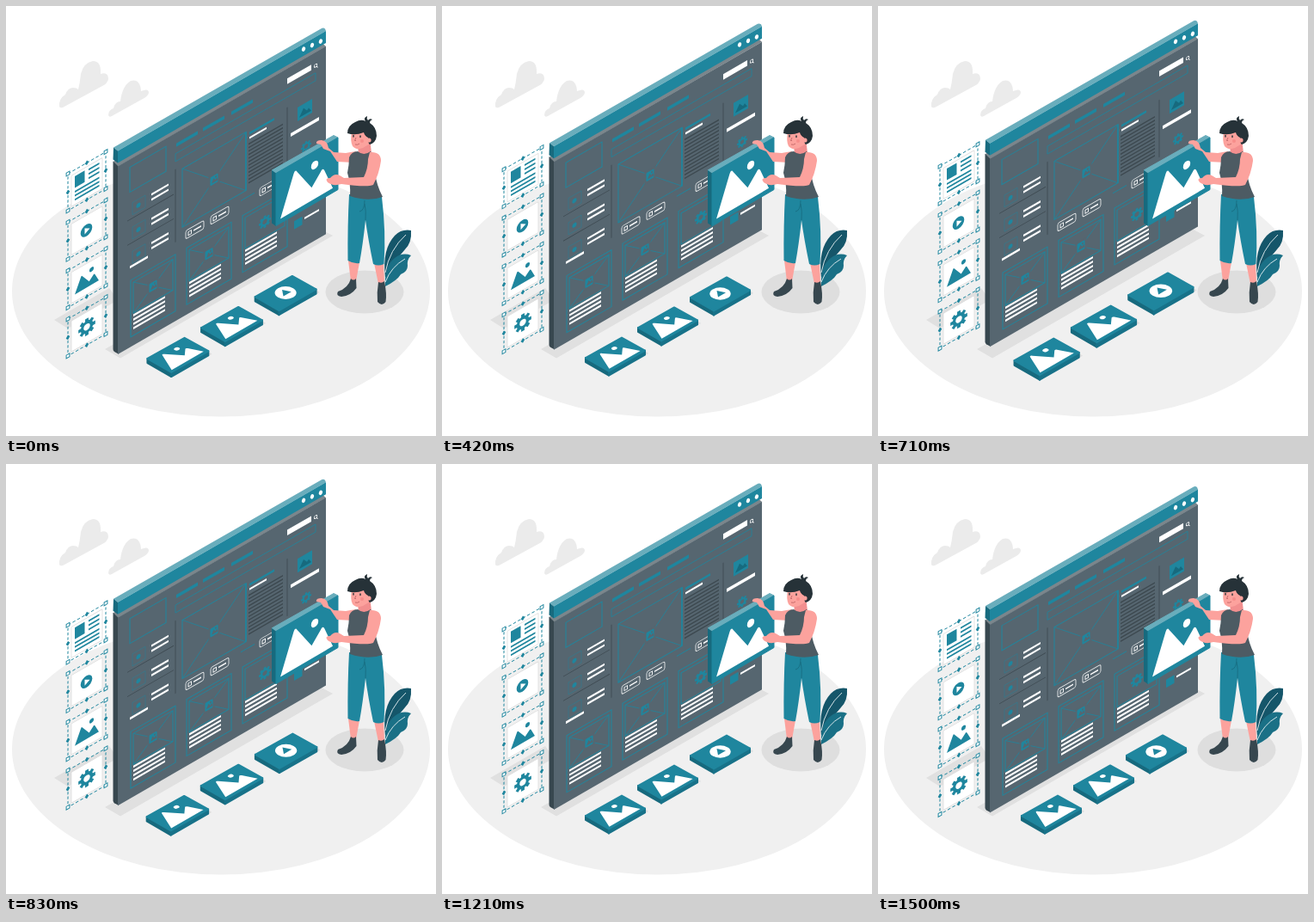
Recreate the animation shown at these times as an HTML page. Size 500 px wide and 500 px high, loop 1.54 s.

```html
<!DOCTYPE html>
<html lang="en">
<head>
<meta charset="utf-8">
<title>Wireframe builder</title>
<style>
html, body { margin: 0; width: 100%; height: 100%; overflow: hidden; background: #fff; }
svg { display: block; width: 100vw; height: 100vh; }
</style>
</head>
<body>
<svg viewBox="0 0 500 500">
  <ellipse cx="250" cy="331.500" rx="243" ry="146" fill="#f0f0f0"/>
  <g fill="#ebebeb">
    <path d="M62 117Q61 108 69 103Q72 95 78 95Q82 95 84 97Q86 89 87 79Q90 66 101 64Q111 64 110 79Q119 76 119 85Q118 90 112 93L66 118Q63 119 62 117Z"/>
    <path d="M119 127Q119 121 125 119Q127 111 133 111Q135 93 145 87Q156 84 157 99Q166 95 166 101Q165 105 159 108L123 128Q120 130 119 127Z"/>
  </g>
  <path d="M56 365L120 328L130 342L72 375ZM115 399L133 409.500L380 267L365 259Z" fill="#e0e0e0"/>
  <ellipse cx="417" cy="332.500" rx="45.500" ry="25" fill="#dedede"/>

  <g id="cards"></g>
  <g id="panel"></g>

  <g id="plant">
    <path d="M441 315Q437 283 452 267Q460 259 471 261Q472 275 464 283Q457 292 450 298Q445 304 443 315Z" fill="#15566a"/>
    <path d="M441 324Q440 302 452 293Q461 286 471 290Q466 295 467 302Q467 309 459 312Q455 319 441 326Z" fill="#1a7086"/>
    <path d="M441 310Q446 283 465 266M441 321Q448 303 464 294" fill="none" stroke="#e8f1f3" stroke-width=".9"/>
  </g>

  <g id="board"></g>

  <g id="person">
    <path d="M407 169Q400 170 395 171L381 170L375 165Q374 157 367 156Q360 156 361 160L366 161L369 166L377 169L385 181L404 182Z" fill="#fca29d"/>
    <path d="M398 296L411 298L407 320H401ZM428 299L439 299L440 323H433Z" fill="#fca29d"/>
    <path d="M401 317Q404 320 407 317L407.500 328Q401 337 390 338Q383 337 386 332Q398 328 401 317Z" fill="#37474f"/>
    <path d="M433 321Q437 323 440 320Q443 335 441.500 344Q437 350 432 344Q431 333 433 321Z" fill="#37474f"/>
    <path d="M399 219L437 222Q442 263 439.500 300Q433 303 427 300Q421 271 418 249Q415 277 411 299Q404 300 397.500 296Q397 255 399 219Z" fill="#1f869e"/>
    <path d="M417 226Q417 238 411 239M418 249Q419 238 417 230" fill="none" stroke="#176a7e" stroke-width=".8"/>
    <path d="M409 160L410 174Q417 178 425 171L423 154Z" fill="#f28f8f"/>
    <path d="M399 176Q402 169 409 169Q416 175 424 169Q430 178 428 190Q431 209 438 222Q421 228 400 221Q401 207 397 194Q399 184 399 176Z" fill="#4d5b63"/>
    <path d="M423 170Q436 169 436 180Q434 195 427 208Q420 211 390 207Q380 210 374 205Q370 200 377 200Q382 194 388 197L393 200L416 199Q421 189 421 178Z" fill="#fca29d"/>
    <path d="M402 146Q400 157 403 163Q407 168 415 165L425 159L424 142Z" fill="#fca29d"/>
    <path d="M397 148Q397 139 406 135Q413 131 418 134Q415 130 420 128Q419 131 421 133Q423 130 426 132Q423 133 423 136Q431 141 431 151Q430 159 423 161Q421 160 421 153Q417 151 416 147Q406 151 397 148Z" fill="#263238"/>
    <circle cx="422" cy="156" r="2.600" fill="#fca29d"/>
    <path d="M404 150.500V152M412 151V152.500" stroke="#263238" stroke-width="1.400" stroke-linecap="round"/>
    <path d="M407 153L405.500 156.500H407M406 161Q409 162 411 160" fill="none" stroke="#b95f60" stroke-width=".8"/>
    <circle cx="414" cy="157" r="2" fill="#f27f7e" opacity=".6"/>
  </g>
</svg>
<script>
const TEAL = '#1f869e', DEEP = '#176a7e', PALE = '#69adbc', INK = '#3d4950', SLATE = '#566670';
const LOOP = 1540, LEAD = 40, RISE = 9.5;
// Mountains in a unit square, shared by every picture symbol
const HILL = 'M.07 .91L.285 .2Q.31 .13 .34 .2L.575 .66L.72 .46Q.75 .4 .78 .47L.917 .9Z';
const el = id => document.getElementById(id);

const rect = (x, y, w, h, fill, extra = '') =>
  `<rect x="${x}" y="${y}" width="${w}" height="${h}" fill="${fill}" ${extra}/>`;
const path = (d, fill, extra = '') => `<path d="${d}" fill="${fill}" ${extra}/>`;
const box = (x, y, w, h, color = TEAL, sw = 1, extra = '') =>
  rect(x, y, w, h, 'none', `stroke="${color}" stroke-width="${sw}" ${extra}`);
const line = (d, color, sw = 0.8) => path(d, 'none', `stroke="${color}" stroke-width="${sw}"`);
const dot = (x, y, r, fill, extra = '') => `<circle cx="${x}" cy="${y}" r="${r}" fill="${fill}" ${extra}/>`;
const group = (m, inner) => `<g transform="matrix(${m})">${inner}</g>`;
const wall = (x, y, inner) => group(`1 -.577 0 1 ${x} ${y}`, inner);
const round = (c, w = 2) => `stroke="${c}" stroke-width="${w}" stroke-linejoin="round"`;
const times = (n, f) => Array.from({ length: n }, (_, i) => f(i)).join('');
const picture = m =>
  group(m, path(HILL, '#fff') + '<ellipse cx=".625" cy=".267" rx=".058" ry=".075" fill="#fff"/>');

function crossed(x, y, w, h) {
  return box(x, y, w, h) + line(`M${x} ${y}l${w} ${h}M${x} ${y + h}l${w} ${-h}`, TEAL, 0.7) +
    rect(x + w / 2 - 6.5, y + h / 2 - 7, 13, 14, SLATE) + glyph(x + w / 2, y + h / 2);
}

function glyph(x, y) {
  return rect(x - 4.5, y - 5, 9, 10, TEAL, 'rx="1"') +
    path(`M${x - 3} ${y + 3}l2.500 -5l2 3l1.500 -2l1.500 4Z`, SLATE) + dot(x + 2, y - 2.5, 1, SLATE);
}

function pill(x, y) {
  return box(x, y, 21, 9.5, '#e6e9ea', 0.9, 'rx="2"') + box(x + 3, y + 3, 3.5, 4, '#fff', 0.9) +
    rect(x + 9, y + 4, 9, 1.6, '#fff');
}

function listItem(i) {
  const y = 54 + i * 28.3;
  return box(17, y - 2, 15, 14, TEAL, 0.4) + dot(24, y + 5, 2.6, TEAL) +
    rect(39, y, 20, 2.4, '#fff') + rect(39, y + 6, 20, 2.4, '#fff') +
    (i < 2 ? line(`M11 ${y + 16}h54`, INK) : '');
}

function gear(x, y, r, color, hole) {
  return times(8, i => rect(x - r * 0.2, y - r, r * 0.4, r, color, `transform="rotate(${i * 45} ${x} ${y})"`)) +
    dot(x, y, r * 0.74, color) + dot(x, y, r * 0.38, hole);
}

function lowCard(i) {
  const x = 15 + i * 65;
  const pic = i < 2 ? crossed(x + 3, 145, 46, 36)
    : box(x + 3, 145, 46, 36) + gear(x + 26, 163, 7, TEAL, SLATE);
  return box(x, 141, 52, 66) + pic + times(4, n => rect(x + 3, 182.5 + n * 5, 37, 2.3, '#fff'));
}

function page() {
  return rect(0, 0, 242, 218.5, SLATE) +
    rect(197, 11.5, 28, 6.5, '#fff') + dot(230, 15.5, 1.7, 'none', 'stroke="#fff" stroke-width=".8"') +
    line('M231 17l1.500 2', '#fff') +
    [68, 99, 132].map(x => rect(x, 12.5, 25, 4, TEAL)).join('') +
    box(67, 24, 163, 9, TEAL, 0.7) +
    box(14, 9, 42, 29) + times(3, listItem) + rect(14, 124, 21, 2.8, '#fff') +
    line('M67 42V127M197 45V112', INK) +
    crossed(75, 46, 74, 68) + line('M149 46V114', TEAL, 1.6) +
    rect(153, 48.5, 29, 2.8, TEAL) + rect(153, 54, 20, 2.4, '#fff') +
    times(12, i => rect(152, 61 + i * 4.1, 40, 1.6, INK)) +
    rect(209, 52, 17, 16, TEAL) + path('M211 65l5 -8l4 5l2 -2l3 5Z', DEEP) +
    rect(201, 77.5, 33, 4, '#fff') + gear(219, 103, 6, TEAL, SLATE) +
    [79, 108, 165].map(x => pill(x, 120.5)).join('') + rect(143, 122, 16, 1, TEAL) +
    times(3, lowCard) + rect(205, 182, 9.5, 9.5, TEAL) + rect(217, 184.5, 17, 2.3, '#fff');
}

const icons = [
  rect(8, 7.5, 11.5, 13.5, TEAL) + times(3, i => rect(24, 8 + i * 5, 12.5, 2, TEAL)) +
    times(3, i => rect(8, 24.5 + i * 4.7, 28.5, 2, TEAL)),
  dot(21.5, 22, 6.8, TEAL) + path('M19.500 18.500L25.500 22L19.500 25.500Z', '#fff'),
  group('33 0 0 22.700 5.700 11.800', path(HILL, TEAL)) + dot(27.5, 14.5, 2.6, TEAL),
  gear(22, 22, 9.8, TEAL, '#fff')
];

function tile(i) {
  const corners = [[0, 0], [44, 0], [44, 43], [0, 43]], mids = [[22, 0], [44, 21.5], [22, 43], [0, 21.5]];
  return wall(72, 195.5 + i * 56.3,
    rect(4, 4.5, 36, 36, '#fff', 'stroke="#dcdcdc" stroke-width=".8" rx="1"') + icons[i] +
    box(0, 0, 44, 43, TEAL, 1, 'stroke-dasharray="3.2 2.2"') +
    mids.map(([x, y]) => path(`M${x} ${y - 2.8}l2.300 2.800l-2.300 2.800l-2.300 -2.800Z`, TEAL)).join('') +
    corners.map(([x, y]) => rect(x - 1.9, y - 1.9, 3.8, 3.8, '#fff', `stroke="${TEAL}"`)).join(''));
}

el('panel').innerHTML =
  path('M124.500 181.500L366 42L372 47.500L130 187.500Z', '#7b868c') +
  path('M124.500 181L130.500 187V405L126 402.500Q124.500 401.500 124.500 399.500Z', '#37474f') +
  wall(130, 187, page()) +
  path('M125 165L367 26.500Q369 25.500 371 27L372 29.500L130 169Z', PALE) +
  path('M125 165L130 169V183L124.500 179Z', DEEP) +
  path('M130 169L372 29.500V43.500L130 183Z', TEAL) +
  [347, 355.3, 363.6].map(x => `<ellipse cx="${x}" cy="${50.8 - (x - 347) * 0.577}" rx="2" ry="2.800" transform="rotate(20 ${x} 48)" fill="#fff"/>`).join('') +
  times(4, tile);

el('board').innerHTML =
  path('M309 191L381 150.500L386 153L314 194.500Z', PALE, round(PALE, 1)) +
  path('M309 191L314 194.500V256L309 252.500Z', DEEP) +
  path('M314 194.500L386 153V213.500L314 255.500Z', TEAL, round(TEAL, 1)) +
  picture('72 -41.500 0 61.500 314 194.500');

function floorCard(i) {
  const pic = i < 2
    ? picture('43 -24.500 28 16 166 409')
    : '<ellipse cx="201.500" cy="404.500" rx="12.200" ry="7.200" fill="#fff"/>' + path('M197.500 401L208 403.200L199 408.500Z', TEAL);
  const side = '#187289';
  return `<g transform="translate(${i * 61} ${i * -35})">` +
    path('M167 414L194 429L240 404L236 401Z', '#dedede') +
    path('M167 409L194 424.500V429.500L167 414Z', DEEP, round(DEEP)) +
    path('M194 424.500L236 400.500V405.500L194 429.500Z', side, round(side)) +
    path('M167 409L209 385.500L236 400.500L194 424.500Z', TEAL, round(TEAL)) + pic + '</g>';
}
el('cards').innerHTML = times(3, floorCard);

// Two beats per cycle, given as [phase, strength]
const beats = [[0, 0], [0.1, 1], [0.3, 0], [0.4, 0], [0.5, 1], [0.6, 0], [1, 0]];
function beat(p) {
  const i = beats.findIndex(b => p < b[0]);
  const [a, u] = beats[i - 1], [b, v] = beats[i];
  return u + (v - u) * (p - a) / (b - a);
}

function draw(ms) {
  const p = ((ms + LEAD) % LOOP) / LOOP;
  const lift = RISE * (1 - Math.abs(2 * p - 1));
  const s = 1 + 0.1 * beat(p);
  el('panel').setAttribute('transform', `translate(0 ${-lift})`);
  el('cards').setAttribute('transform', `translate(262.5 372) scale(${s}) translate(-262.5 -372)`);
}

const start = performance.now();
function tick() {
  draw(performance.now() - start);
  requestAnimationFrame(tick);
}
draw(0);
requestAnimationFrame(tick);
</script>
</body>
</html>
```
